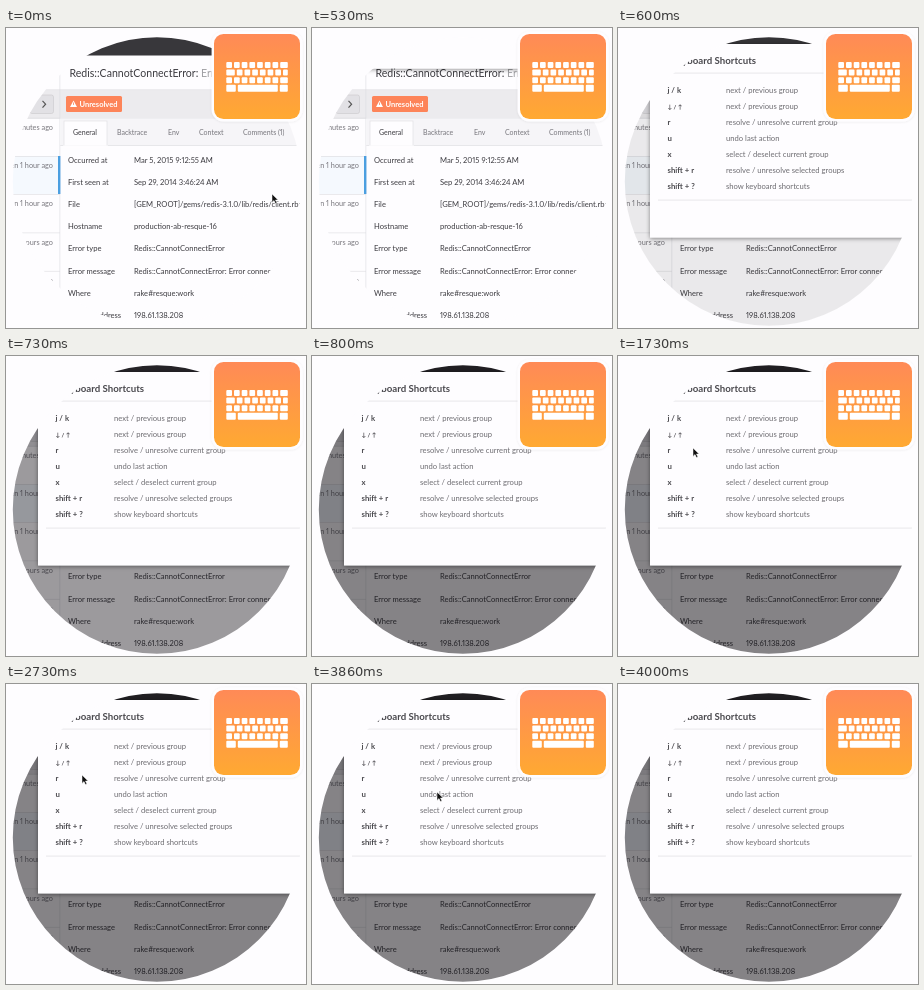
Write an HTML page that moves like this. It is 300 by 300 pixels and loops after 4070 ms.

```html
<!DOCTYPE html>
<html lang="en">
<head>
<meta charset="utf-8">
<title>Keyboard shortcuts</title>
<style>
html, body { margin: 0; width: 100%; height: 100%; overflow: hidden; background: #fefdff; }
svg { display: block; width: 100%; height: 100%; }
text {
  font-family: Lato, "DejaVu Sans", sans-serif; font-size: 7.6px; fill: #3c3b40;
  font-variant-numeric: proportional-nums; white-space: pre;
}
.soft { fill: #77767c; }
.tab { font-size: 7px; }
.help { font-size: 7.65px; fill: #6c6b70; }
.key { font-size: 7.8px; font-weight: 700; fill: #4a494e; }
.arrows { font-size: 6px; }
</style>
</head>
<body>
<svg viewBox="0 0 300 300">
  <defs>
    <linearGradient id="warm" x1="0" y1="0" x2="0" y2="1">
      <stop offset="0" stop-color="#ff8a57"/>
      <stop offset="1" stop-color="#ffa932"/>
    </linearGradient>
    <filter id="shade" x="-10%" y="-10%" width="120%" height="120%">
      <feDropShadow dx="0" dy="1" stdDeviation="2" flood-color="#000" flood-opacity=".45"/>
    </filter>
    <filter id="glow" x="-10%" y="-10%" width="120%" height="120%">
      <feDropShadow dx="0" dy=".5" stdDeviation=".8" flood-color="#000" flood-opacity=".08"/>
    </filter>
  </defs>
  <g id="page"></g>
  <rect id="veil" width="300" height="300" fill="#08060a"/>
  <g id="modal"></g>
  <path id="surround" fill="#fefdff" fill-rule="evenodd"
    d="M-9-9H309V309H-9ZM6.8 153.5a144.2 144.2 0 1 0 288.4 0a144.2 144.2 0 1 0 -288.4 0Z"/>
  <g id="badge"></g>
  <path id="cursor" d="M0 0V8.4L2 6.6L3.4 9.6L4.9 8.9L3.5 6H6.1Z" fill="#111" stroke="#fff" stroke-width=".5"/>
</svg>
<script>
const $ = id => document.getElementById(id);
const WHITE = "#fefdff", RULE = "#dddce0";

function add(parent, tag, attrs, content) {
  const el = document.createElementNS("http://www.w3.org/2000/svg", tag);
  for (const k in attrs) el.setAttribute(k, attrs[k]);
  if (content) el.textContent = content;
  parent.appendChild(el);
  return el;
}
const rect = (p, x, y, width, height, fill, more) => add(p, "rect", { x, y, width, height, fill, ...more });
const text = (p, x, y, str, more) => add(p, "text", { x, y, ...more }, str);

function buildPage(p) {
  rect(p, 0, 0, 300, 300, WHITE);
  rect(p, 0, 0, 300, 27.5, "#38373b");
  rect(p, 0, 62, 300, 28, "#ecebee");
  rect(p, 0, 61.5, 300, .6, RULE);
  rect(p, 0, 90, 300, .6, RULE);

  // sidebar
  rect(p, 24, 67, 23.5, 18.5, "#e2e1e5", { rx: 2, stroke: "#c9c8cc", "stroke-width": .6 });
  add(p, "path", { d: "M36.5 72.8L39.6 76.2L36.5 79.6", fill: "none", stroke: "#555", "stroke-width": 1.2 });
  rect(p, 0, 128, 54, 38, "#f5f9fe");
  ["2 minutes", "1 hour", "1 hour", "5 hours", "6 hours"].forEach((age, i) => {
    const y = 89.7 + i * 38.3;
    rect(p, 0, y, 54, .6, RULE);
    text(p, 47, y + 12, `last seen ${age} ago`, { class: "soft", "text-anchor": "end", style: "font-size:7.3px" });
  });
  rect(p, 53.6, 28, .6, 234, RULE);
  rect(p, 52, 128, 2.4, 38, "#4b9fe0");

  // heading
  const title = text(p, 63.5, 48.6, "Redis::CannotConnectError:", { style: "font-size:10.55px" });
  add(title, "tspan", { fill: "#a0a0a4" }, " Error connecting");
  rect(p, 60, 68, 56, 16, "#fd8459", { rx: 1.5 });
  add(p, "path", { d: "M67.5 72.4L71 79H64Z", fill: "#fff" });
  rect(p, 67.1, 74.5, .8, 2.4, "#fd8459");
  text(p, 73.5, 78.7, "Unresolved", { style: "font-size:7.5px;fill:#fff;font-weight:700" });

  // tabs
  rect(p, 54.2, 90.6, 246, 27, "#f6f5f8");
  rect(p, 54.2, 117, 246, .6, RULE);
  rect(p, 58, 93, 43, 25, WHITE, { stroke: RULE, "stroke-width": .6 });
  rect(p, 57, 117.4, 45, 2, WHITE);
  text(p, 67, 106.6, "General", { class: "tab" });
  [[111, "Backtrace"], [162, "Env"], [193, "Context"], [237, "Comments (1)"]]
    .forEach(([x, s]) => text(p, x, 106.6, s, { class: "soft tab" }));

  [
    ["Occurred at", "Mar 5, 2015 9:12:55 AM"],
    ["First seen at", "Sep 29, 2014 3:46:24 AM"],
    ["File", "[GEM_ROOT]/gems/redis-3.1.0/lib/redis/client.rb:309"],
    ["Hostname", "production-ab-resque-16"],
    ["Error type", "Redis::CannotConnectError"],
    ["Error message", "Redis::CannotConnectError: Error connecting to"],
    ["Where", "rake#resque:work"],
    ["Remote address", "198.61.138.208"]
  ].forEach(([label, value], i) => {
    const y = 134.8 + i * 22.15;
    text(p, 62, y, label);
    text(p, 128, y, value);
  });
}

function buildModal(p) {
  rect(p, 32, 16, 290, 193.5, WHITE, { filter: "url(#shade)" });
  text(p, 138, 36.4, "Keyboard Shortcuts", { "text-anchor": "end", style: "font-size:9.7px;font-weight:700;fill:#4a494e" });
  rect(p, 32, 44.7, 290, .7, RULE);
  rect(p, 40, 171.7, 290, .7, RULE);
  [
    ["j / k", "next / previous group"],
    ["↓ / ↑", "next / previous group", "arrows"],
    ["r", "resolve / unresolve current group"],
    ["u", "undo last action"],
    ["x", "select / deselect current group"],
    ["shift + r", "resolve / unresolve selected groups"],
    ["shift + ?", "show keyboard shortcuts"]
  ].forEach(([key, help, look = ""], i) => {
    text(p, 49.5, 65 + i * 16, key, { class: `key ${look}` });
    text(p, 108, 65 + i * 16, help, { class: "help" });
  });
}

function buildBadge(p) {
  rect(p, 205.6, 3.6, 91, 90, WHITE, { rx: 12, filter: "url(#glow)" });
  rect(p, 208, 6, 86, 85, "url(#warm)", { rx: 9.5 });
  const keyRow = (y, h, widths) => {
    let x = 220.3;
    for (const w of widths) {
      rect(p, x, y, w, h, "#fff", { rx: 1 });
      x += w + 2;
    }
  };
  const keys = n => Array(n).fill(5.7);
  keyRow(34, 6, [...keys(7), 7.6]);
  keyRow(41.6, 6, [8.5, ...keys(6), 4.8]);
  keyRow(49.2, 6, [...keys(7), 7.6]);
  keyRow(56.8, 7, [9.5, 40, 8]);
}

// [step, x, y]; null hides the pointer from that step on
const path = [
  [0, 266, 166], [1, 267, 166], [3, 272, 166], [6, 289, 165], [7, null],
  [14, 288, 160], [15, 272, 162], [16, 259, 163], [17, 249, 160], [19, 205, 139],
  [21, 140, 103], [22, 102, 85], [23, 84, 81], [24, 77, 87], [25, 75, 90],
  [26, 75, 92], [35, 75, 92], [36, 75, 91], [40, 75, 91], [41, 76, 91],
  [57, 76, 91], [58, 125, 108], [59, 269, 151], [60, null]
];

function pointer(n) {
  const i = path.findLastIndex(k => k[0] <= n);
  const [s, x, y] = path[i];
  if (x === null) return null;
  const next = path[i + 1];
  if (!next || next[1] === null) return [x, y];
  const f = (n - s) / (next[0] - s);
  return [x + (next[1] - x) * f, y + (next[2] - y) * f];
}

const LOOP = 4070, STEP = 200 / 3;
const OPENS = 8, DIMS = 9;
const show = (id, on) => $(id).style.display = on ? "" : "none";

function draw(ms) {
  const n = Math.min(60, Math.floor((ms % LOOP + 7) / STEP));
  show("modal", n >= OPENS);
  $("modal").setAttribute("transform", `translate(0 ${n === OPENS ? -169 : 0})`);
  show("veil", n >= DIMS);
  $("veil").setAttribute("opacity", Math.max(0, Math.min(.49, .08 + .16 * (n - DIMS))));
  const at = pointer(n);
  show("cursor", at);
  if (at) $("cursor").setAttribute("transform", `translate(${at})`);
}

buildPage($("page"));
buildModal($("modal"));
buildBadge($("badge"));

const start = performance.now();
function tick() {
  draw(performance.now() - start);
  requestAnimationFrame(tick);
}
tick();
</script>
</body>
</html>
```
